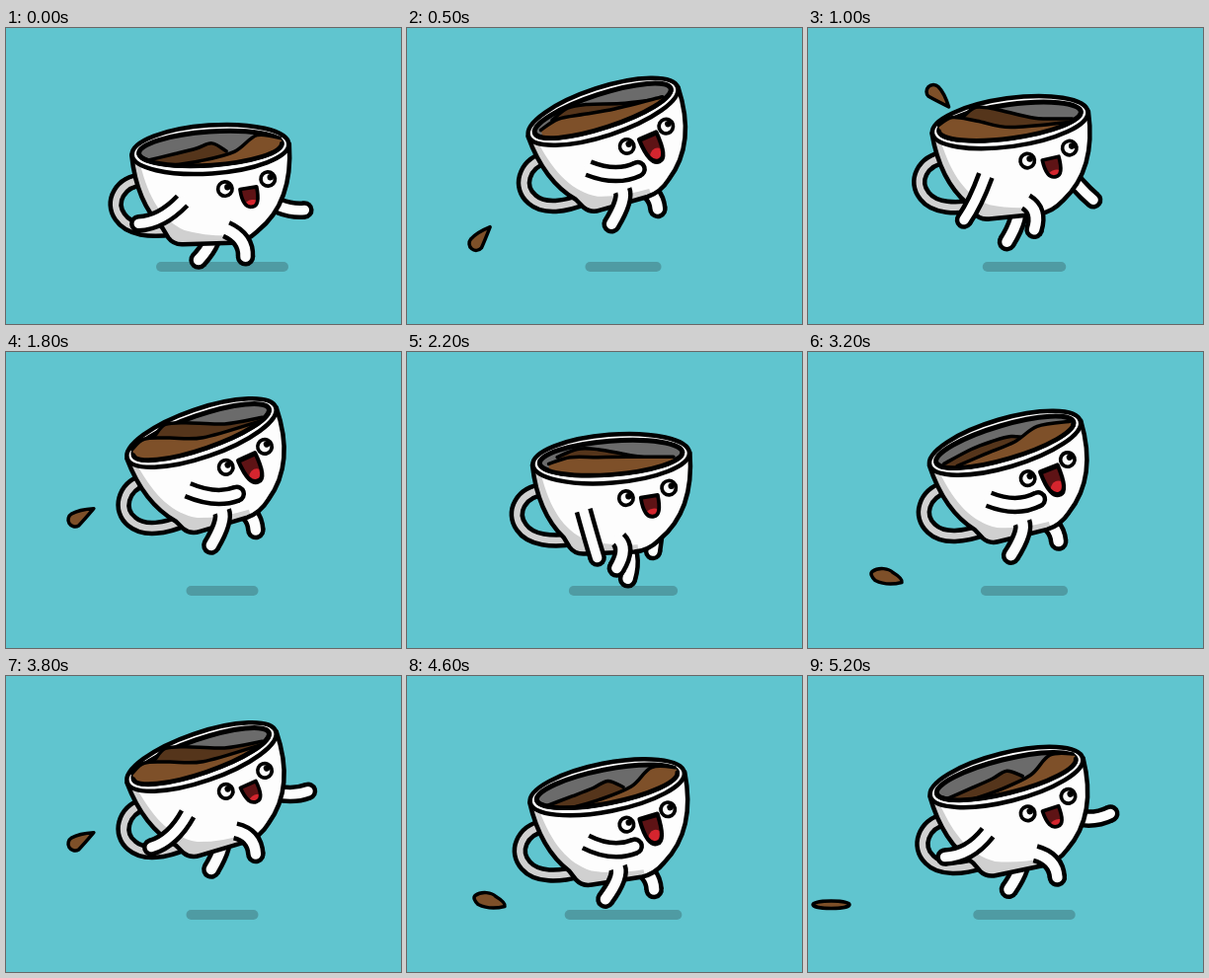
An HTML page with a canvas for the animation above (5.3 s loop, 400 by 300 pixels).

```html
<!DOCTYPE html>
<html lang="en">
<head>
<meta charset="utf-8">
<title>Running coffee cup</title>
<style>
  html, body { margin: 0; width: 100%; height: 100%; overflow: hidden; background: #60c5cf; }
  canvas { display: block; }
</style>
</head>
<body>
<canvas id="stage" width="400" height="300"></canvas>
<script>
const ctx = document.getElementById('stage').getContext('2d');
const INK = '#000', WHITE = '#fdfdfd', GREY = '#d0d0d0', BROWN = '#7e5029', DARK = '#55351b';
const LOOP = 5300, HOLD = 100, STEP = 3.02; // drawing steps per held picture
const BOUNCE = 20, STRIDE = 40, APEX = 14;  // in steps
const { PI, sin, cos, min, max } = Math;

// Shapes in cup space: origin at the middle of the rim.
const BODY = new Path2D('M-80 0C-79 32-70 58-54 76L-49 86Q-44 94-34 94L16 96Q30 96 42 86C62 72 80 48 80 0Z');
const SHADE = new Path2D('M-90 0L-72 10C-66 45-54 68-32 80Q-10 88 20 89V100H-90Z');
const HANDLE = new Path2D('M-70 26C-94 26-106 46-96 62C-88 76-66 80-44 78');
const BASIN = new Path2D('M-75-1A72.5 17 0 0 0 72.5-1V-60H-75Z');
const LIP = new Path2D('M-72.5-1A72.5 17 0 0 0 72.5-1');
const JAW = new Path2D('M-8.5-9L8.5-9.5Q10 10 2 10Q-8 11-8.5-9Z');
const SPLAT = new Path2D('M-15-5C-8-10 2-8 6-4Q16 2 15 6Q0 10-12 4Q-18-2-15-5Z');

// Crest lines of the coffee, settled and thrown back.
const FRONT = [[-47, 14, -11, 11, 24, 4, 48, -11, 73, -6], [-72, -7, -57, -13, -33, -6, 0, 5, 58, 8]];
const BACK = [[-72, 8, -36, 2, -14, -2, 2, -6, 16, 3], [-45, -13, -32, -20, -12, -15, 25, -1, 63, 5]];

const ease = k => (1 - cos(PI * min(1, max(0, k)))) / 2;
const mix = (a, b, k) => a + (b - a) * k;

// 0 on the ground, 1 at the apex; `rise` and `fall` shape the two halves.
const hop = (step, rise, fall) =>
  step < APEX ? rise(step / APEX) : fall((BOUNCE - step) / (BOUNCE - APEX));

function within(x, y, deg, draw) {
  ctx.save();
  ctx.translate(x, y);
  ctx.rotate(deg * PI / 180);
  draw();
  ctx.restore();
}

function paint(path, fill, line = 4.5) {
  if (fill) { ctx.fillStyle = fill; ctx.fill(path); }
  if (line) { ctx.strokeStyle = INK; ctx.lineWidth = line; ctx.stroke(path); }
}

function clipped(area, draw) {
  ctx.save();
  ctx.clip(area);
  draw();
  ctx.restore();
}

function ellipse(x, y, rx, ry = rx) {
  const p = new Path2D();
  p.ellipse(x, y, rx, ry, 0, 0, 2 * PI);
  return p;
}

// Rounded tube that is open at its root.
function tube(path, width, fill, cap) {
  ctx.lineCap = 'butt';
  paint(path, null, width);
  ctx.lineCap = cap;
  ctx.strokeStyle = fill;
  ctx.lineWidth = width - 9;
  ctx.stroke(path);
}

function limb(x, y, bx, by, tx, ty, width) {
  const p = new Path2D();
  p.moveTo(x, y);
  p.quadraticCurveTo(bx, by, tx, ty);
  paint(ellipse(tx, ty, width / 2), INK, 0);
  tube(p, width, WHITE, 'round');
}

const armSwing = beat => -cos(2 * PI * (beat + 3) / STRIDE);

function arm(x, y, swing) {
  const a = swing * 1.3, dx = 50 * sin(a), dy = 50 * cos(a);
  limb(x, y, x + dx / 2, y + dy / 2 + 12 * Math.abs(swing), x + dx, y + dy, 18.5);
}

// Quick push backwards on the ground, slow swing forwards in the air.
function leg(beat) {
  const k = (beat + STRIDE - 1) % STRIDE, push = 12;
  const down = k < push;
  const a = PI * (down ? k / push : 1 + (k - push) / (STRIDE - push));
  const fx = 28 * cos(a), fy = 111 + (down ? 12 * sin(a) : 0);
  const hx = 2 + fx * .3, hy = 82;
  limb(hx, hy, (hx + fx) / 2 + 11, (hy + fy) / 2 - 4, fx, fy, 19.5);
}

function wave([calm, thrown], slosh, fill) {
  const pts = calm.map((v, i) => mix(v, thrown[i], slosh));
  const at = i => { i = min(4, max(0, i)); return [pts[2 * i], pts[2 * i + 1]]; };
  const crest = new Path2D();
  crest.moveTo(...at(0));
  for (let i = 0; i < 4; i++) {
    const [a, b, c, d] = [at(i - 1), at(i), at(i + 1), at(i + 2)];
    crest.bezierCurveTo(b[0] + (c[0] - a[0]) / 6, b[1] + (c[1] - a[1]) / 6,
      c[0] - (d[0] - b[0]) / 6, c[1] - (d[1] - b[1]) / 6, ...c);
  }
  const area = new Path2D(crest);
  area.lineTo(at(4)[0], 40);
  area.lineTo(at(0)[0], 40);
  paint(area, fill, 0);
  paint(crest, null, 3.5);
}

function cup(step) {
  const slosh = step < APEX ? ease(step / 10) : ease((17 - step) / 3);
  clipped(BODY, () => { paint(BODY, WHITE, 0); paint(SHADE, GREY, 0); });
  paint(BODY);
  paint(ellipse(0, 0, 79.5, 24.5), WHITE);
  paint(ellipse(0, -1, 72.5, 17), '#6b6b6b', 5);
  clipped(BASIN, () => { wave(BACK, slosh, DARK); wave(FRONT, slosh, BROWN); });
  paint(LIP);
}

function face(open) {
  for (const [x, y] of [[12, 41], [56, 34]]) {
    paint(ellipse(x, y, 7.2), WHITE, 3.7);
    paint(ellipse(x + 2.6, y - 1.6, 3.2), INK, 0);
  }
  within(36, 51, -3, () => {
    ctx.scale(1 + .12 * open, 1 + .45 * open);
    clipped(JAW, () => {
      paint(JAW, '#5e1315', 0);
      paint(ellipse(2, 8, 7.5, 5 + 2.5 * open), '#d5252e', 0);
    });
    paint(JAW, null, 3.7);
  });
}

function drop(step) {
  if (step === 17) paint(ellipse(23.5, 231.7, 18.5, 3.8), BROWN, 3.5);
  else if (step > 15) within(48 + 2 * step, 227.5, 0, () => step < 19 && paint(SPLAT, BROWN, 3.5));
  const age = step - 9, r = 7, tail = 22;
  if (age < 1 || age > 6) return;
  within(max(70, 142 - 15 * age), 60 + 4.4 * age * age, 64 - 19 * age, () => {
    const p = new Path2D();
    p.moveTo(tail, 0);
    p.quadraticCurveTo(tail * .4, -r, 0, -r);
    p.arc(0, 0, r, -PI / 2, PI / 2, true);
    p.quadraticCurveTo(tail * .35, r * .7, tail, 0);
    p.closePath();
    paint(p, BROWN, 3.5);
  });
}

function shadow(step) {
  const w = 134 - 61 * hop(step, ease, ease);
  ctx.fillStyle = '#4f9ba3';
  ctx.beginPath();
  ctx.roundRect(219 - w / 2, 237, w, 10, 5);
  ctx.fill();
}

function draw(time) {
  const count = Math.floor(Math.floor(time % LOOP / HOLD) * STEP);
  const step = count % BOUNCE, beat = count % STRIDE;
  const height = hop(step, k => k ** 1.2, ease);
  const lean = hop(step, k => k ** 4, k => 1 - (1 - k) ** 1.6);
  const swing = armSwing(beat);

  ctx.lineJoin = 'round';
  ctx.fillStyle = '#60c5cf';
  ctx.fillRect(0, 0, 400, 300);
  shadow(step);
  drop(step);
  within(207 - 9 * lean, 123 - 41 * height, -4 - 15 * lean, () => {
    leg(beat + STRIDE / 2);
    arm(45, 48, -swing);
    tube(HANDLE, 15.5, GREY, 'butt');
    ctx.lineCap = 'round';
    cup(step);
    face(max(0, swing));
    leg(beat);
    arm(-32, 50, swing);
  });
}

function tick() {
  draw(performance.now());
  requestAnimationFrame(tick);
}
tick();
</script>
</body>
</html>
```
